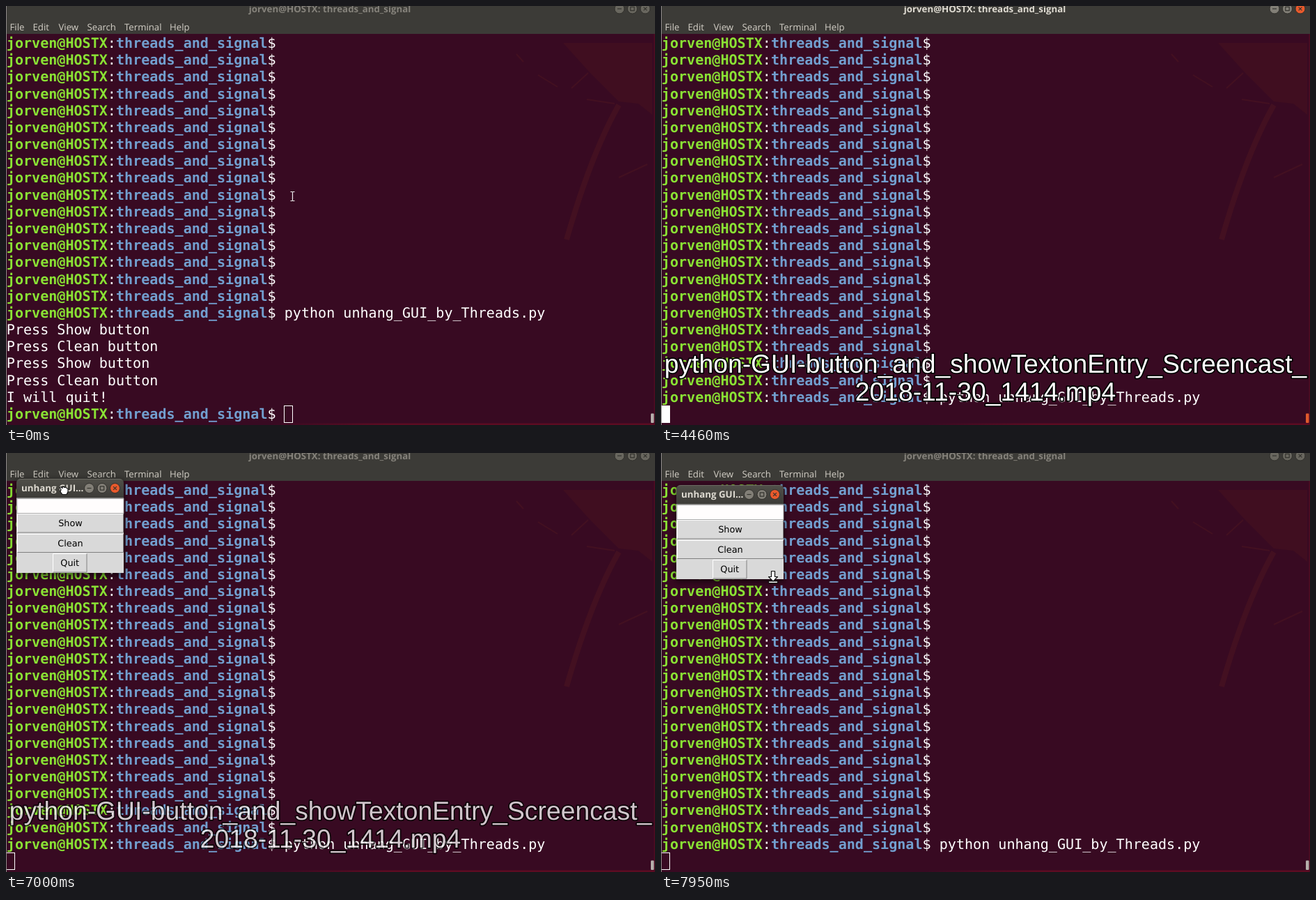
Recreate the animation shown at these times as an HTML page. Size 932 by 601 pixels, loop 8000 ms.

```html
<!DOCTYPE html>
<html lang="en">
<head>
<meta charset="utf-8">
<title>Terminal screencast</title>
<style>
  html, body { margin: 0; width: 100%; height: 100%; overflow: hidden; background: #380a22; }
  svg { display: block; width: 932px; height: 601px; text-rendering: geometricPrecision; }
  text { white-space: pre; }
  .mono { font: 20.08px "DejaVu Sans Mono", monospace; fill: #fff; }
  .user { font-weight: bold; fill: #8ae234; }
  .path { font-weight: bold; fill: #729fcf; }
  .menu { font: 13.2px "Open Sans", sans-serif; fill: #d3cfc6; }
  .title { font: bold 13.3px "Open Sans", sans-serif; }
  .tk { font: 12.8px "DejaVu Sans", sans-serif; fill: #000; text-anchor: middle; }
  .caption {
    font: 37.3px "Liberation Sans", Arial, sans-serif; font-kerning: normal; text-anchor: middle;
    fill: #fff; stroke: #000; stroke-width: 3.4; stroke-linejoin: round; paint-order: stroke;
  }
  .pointer { fill: #fff; stroke: #111; stroke-width: 1.2; stroke-linejoin: round; }
</style>
</head>
<body>
<svg viewBox="0 0 932 601">
  <defs>
    <linearGradient id="bar" x2="0" y2="1">
      <stop offset="0" stop-color="#504f49"/><stop offset="1" stop-color="#3c3b37"/>
    </linearGradient>
    <linearGradient id="edge">
      <stop offset="0" stop-color="#5c0c22" stop-opacity="0"/><stop offset=".3" stop-color="#5c0c22"/>
    </linearGradient>
    <filter id="blur" x="-20%" y="-20%" width="140%" height="140%"><feGaussianBlur stdDeviation="5"/></filter>
  </defs>

  <rect width="932" height="601" fill="#380a22"/>
  <g fill="none" stroke="#431021" stroke-width="2">
    <path d="M800 53H928V156L908 140L880 137L838 95Z" fill="#400e20" stroke="none"/>
    <path d="M880 142C850 195 826 262 805 335" stroke-width="8"/>
    <path d="M733 69l10 11M764 99l28 17M812 118l24-22M834 134l40 6M880 246l41-19"/>
  </g>
  <rect id="patch" x="377" y="547" width="306" height="50" fill="#340921"/>
  <rect id="tick" x="680.5" y="599.5" width="1.5" height="1.5" fill="#eee"/>
  <rect x="380" y="598.5" width="552" height="2.5" fill="url(#edge)"/>
  <rect x="930.5" y="40" width="1.5" height="561" fill="#4e0d22"/>

  <rect width="932" height="40" fill="#3c3b37"/>
  <text id="title" class="title" x="465" y="8.5" text-anchor="middle"></text>
  <g id="buttons" transform="translate(881 4)"></g>
  <g id="menu"></g>
  <rect id="thumb" x="926" y="584.5" width="4.5" height="13.5" rx="1"/>

  <g id="rows"></g>
  <rect id="cursor" stroke="#fff"/>
  <rect width="1" height="601" fill="#8f8a8a"/>

  <g id="win">
    <rect x="-1" y="2" width="156" height="137" fill="#000" opacity=".6" filter="url(#blur)"/>
    <path d="M0 28V6Q0 0 6 0H148Q154 0 154 6V28Z" fill="url(#bar)"/>
    <path d="M3 1.5Q5 .5 7 .5H147Q149 .5 151 1.5" fill="none" stroke="#6a6962"/>
    <text class="title" x="7" y="18" fill="#dfdbd2">unhang GUI...</text>
    <g id="winButtons" transform="translate(104.5 13.5)"></g>
    <rect y="27.5" width="154" height="107.5" fill="#d9d9d9"/>
    <rect x="1" y="28.5" width="153" height="21" fill="#fffdfd" stroke="#9a9a9a" stroke-width=".8"/>
    <g id="tkButtons"></g>
  </g>

  <g id="caption" class="caption">
    <text x="466" y="525.7">python-GUI-button_and_showTextonEntry_Screencast_</text>
    <text x="466" y="565.7">2018-11-30_1414.mp4</text>
  </g>

  <path id="beam" d="M-3-6.5H-.8L0-6L.8-6.5H3M0-6V6M-3 6.5H-.8L0 6L.8 6.5H3" fill="none" stroke="#eee" stroke-width="1.2"/>
  <path id="hand" class="pointer" d="M-4-1L-6-4L-4-5L-2-3V-5H0L1-4L3-4.500L4-3L6-2.500V2L4 6H-2L-5 2Z"/>
  <path id="arrow" class="pointer" d="M0 0V15L3.500 12L6 17.500L8.500 16.500L6 11H10.500Z"/>
  <path id="resize" class="pointer" d="M-2.500-9H2.500V-1H6.500L0 5.500L-6.500-1H-2.500ZM-6.500 5.500H6.500V8H-6.500Z"/>
</svg>
<script>
const LOOP = 8000, PITCH = 12.09, ROW = 24.18, TOP = 41, LAST = 22;
const USER = "jorven@HOSTX", DIR = "threads_and_signal";
const COMMAND = "python unhang_GUI_by_Threads.py";
const OUTPUT = ["Press Show button", "Press Clean button", "Press Show button", "Press Clean button", "I will quit!"];

const $ = id => document.getElementById(id);
const show = (id, on) => $(id).setAttribute("visibility", on ? "visible" : "hidden");
const attrs = (id, values) => {
  for (const name in values) $(id).setAttribute(name, values[name]);
};

// Value of the last [time, value] pair that has started
const step = (t, pairs) => {
  let value = null;
  for (const [start, v] of pairs) if (t >= start) value = v;
  return value;
};

const place = (id, pos) => {
  show(id, pos);
  if (pos) attrs(id, { transform: `translate(${pos[0]} ${pos[1]})` });
};

function windowButtons(gap, active) {
  const marks = ["M-3 0H3", "M-2.7-2.7H2.7V2.7H-2.7Z", "M-2.4-2.4L2.4 2.4M2.4-2.4L-2.4 2.4"];
  return marks.map((d, i) => {
    const fill = active ? (i === 2 ? "#ea5a2c" : "#827f77") : "#69675f";
    return `<g transform="translate(${i * gap} 0)"><circle r="7" fill="${fill}" stroke="#302f2b"/>` +
      `<path d="${d}" fill="none" stroke="#35342f" stroke-width="1.2"/></g>`;
  }).join("");
}

function tkButton(label, x, y, w, h) {
  return `<path d="M${x} ${y + h}V${y}H${x + w}" fill="none" stroke="#fff"/>` +
    `<path d="M${x} ${y + h}H${x + w}V${y}" fill="none" stroke="#808080"/>` +
    `<text class="tk" x="${x + w / 2}" y="${y + h / 2 + 4.5}">${label}</text>`;
}

const prompt = `<tspan class="user">${USER}</tspan>:<tspan class="path">${DIR}</tspan>$ `;

function screenLines(scene, typed) {
  if (scene === 0) return [...Array(16).fill(prompt), prompt + COMMAND, ...OUTPUT, prompt];
  if (scene === 1) return [...Array(LAST).fill(prompt), prompt + (typed ? COMMAND : "")];
  return [...Array(LAST - 1).fill(prompt), prompt + COMMAND, ""];
}

let screenKey, focusKey;

function drawScreen(scene, typed) {
  const key = scene + "/" + typed;
  if (key === screenKey) return;
  screenKey = key;
  $("rows").innerHTML = screenLines(scene, typed)
    .map((line, i) => `<text class="mono" x=".8" y="${(TOP + 19 + i * ROW).toFixed(2)}">${line}</text>`).join("");
}

function drawFocus(active) {
  if (active === focusKey) return;
  focusKey = active;
  attrs("title", { fill: active ? "#dfdbd2" : "#85827b" });
  attrs("thumb", { fill: active ? "#e0592c" : "#b5afab" });
  $("buttons").innerHTML = windowButtons(18.5, active);
}

function drawCursor(column, filled, on) {
  show("cursor", on);
  const inset = filled ? 0 : .5;
  attrs("cursor", {
    x: Math.floor(column * PITCH + .8) + inset, y: 573 + inset,
    width: 13 - 2 * inset, height: 25 - 2 * inset,
    fill: filled ? "#fff" : "none", "stroke-width": filled ? 0 : 1
  });
}

const beamPath = [
  [0, [411.5, 273]], [150, [352, 151]], [270, [384, 203]], [420, [392, 209]], [570, [378, 134]], [690, null],
  [5290, [518, 458.5]], [5440, [442, 247.5]], [5580, [347.5, 79]], [6580, null]
];
const winPath = [
  [6580, [42, -104]], [6740, [8, 26.5]], [6880, [11, 31]], [7000, [15, 37]], [7120, [19, 42]], [7270, [22, 46]]
];
const fadeTimes = [6880, 7000, 7120, 7270, 7390, 7540, 7680, 7810, 7950];
const fade = [[0, 1], ...fadeTimes.map(t => [t, Math.max(0, 1 - (t - 6740) / 1130)])];

function draw(t) {
  const scene = step(t, [[0, 0], [3070, 1], [4460, 2]]);
  const typed = t >= 3650 && t < 4460;
  const active = t >= 3070 && t < 4880;
  drawScreen(scene, typed);
  drawFocus(active);
  drawCursor(scene === 2 ? 0 : typed ? 65 : 33, active, !(t >= 4210 && t < 4460));

  show("patch", t >= 420 && t < 3070);
  show("tick", t < 420);
  show("caption", t >= 3070);
  attrs("caption", { opacity: step(t, fade) });

  const win = step(t, winPath);
  place("win", win);
  place("beam", step(t, beamPath));
  place("hand", win && t < 7680 ? [win[0] + 68, win[1] + 16.5] : null);
  place("arrow", step(t, [[7680, [96, 68]], [7810, [143, 128]], [7950, null]]));
  place("resize", step(t, [[7950, [161, 178.5]]]));
}

$("title").textContent = `${USER}: ${DIR}`;
$("winButtons").innerHTML = windowButtons(18.5, true);
$("tkButtons").innerHTML =
  tkButton("Show", 1.5, 50.5, 152, 26.5) +
  tkButton("Clean", 1.5, 79.5, 152, 26) +
  tkButton("Quit", 52.5, 107.5, 48.5, 26.5);
$("menu").innerHTML = Object.entries({ File: 5.5, Edit: 38.5, View: 75.5, Search: 116.5, Terminal: 170, Help: 235 })
  .map(([name, x]) => `<text class="menu" x="${x}" y="34.5">${name}</text>`).join("");

const start = performance.now();
function tick() {
  draw((performance.now() - start) % LOOP);
  requestAnimationFrame(tick);
}
tick();
</script>
</body>
</html>
```
